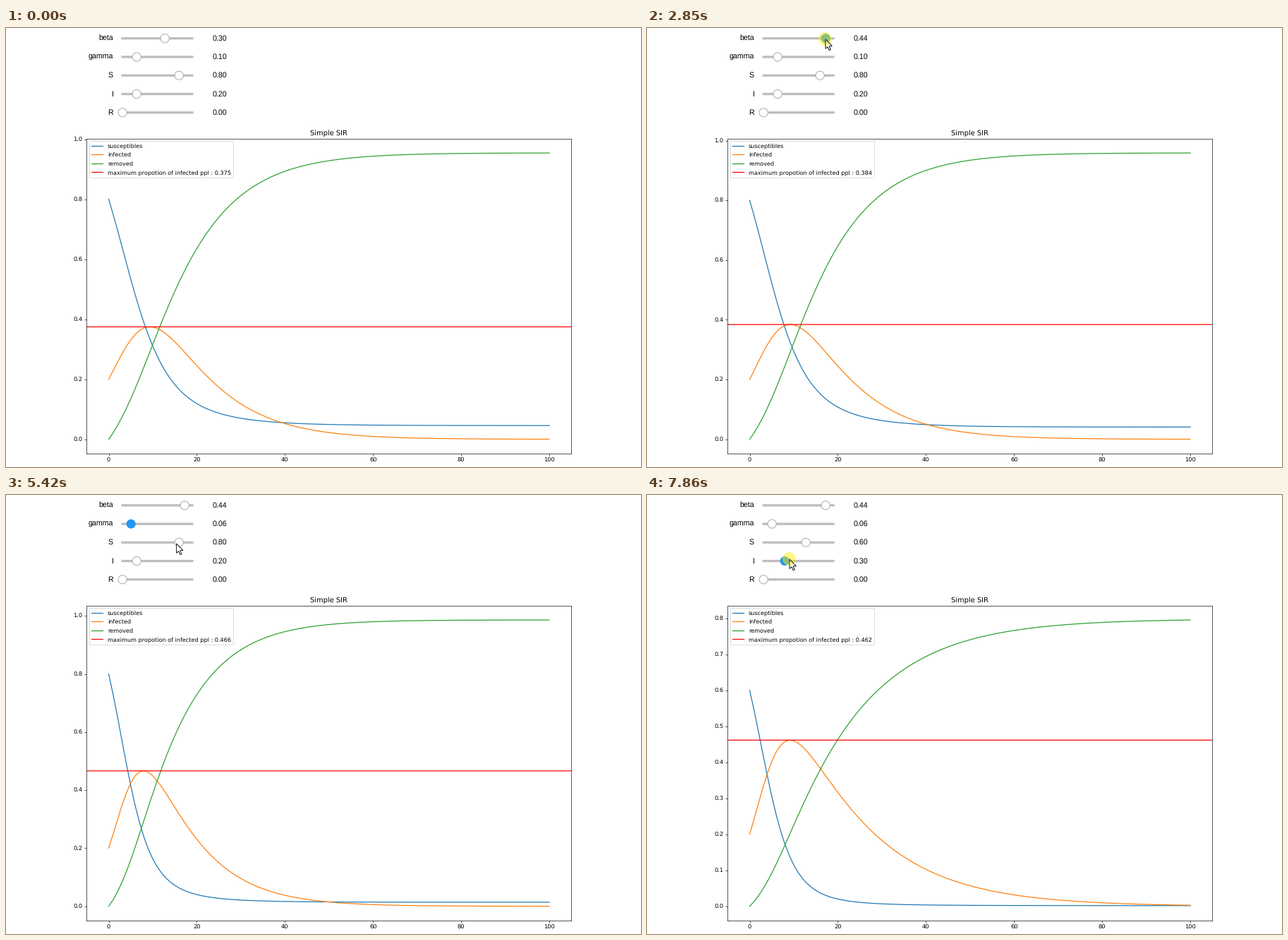
Recreate the animation shown at these times as a matplotlib script. Size 900 px wide and 622 px high, loop 8 s.

```python
import numpy as np
import matplotlib.pyplot as plt
from matplotlib.animation import FuncAnimation
from matplotlib.patches import Circle, Polygon, Rectangle

W, H, DPI = 900, 622, 64
LOOP, STEP = 8000, 40
K = 0.9234  # chart scale relative to default point sizes

plt.rcParams.update({
    "font.family": "DejaVu Sans", "font.size": 10 * K, "text.hinting": "none",
    "axes.linewidth": 0.8 * K, "axes.titlepad": 6.3 * K,
    "lines.linewidth": 1.5 * K, "patch.linewidth": K,
    "legend.fontsize": 9.86 * K, "legend.labelspacing": 0.59,
    "legend.borderaxespad": 0.45,
})
for axis in ("xtick", "ytick"):
    plt.rcParams.update({f"{axis}.major.width": 0.8 * K,
                         f"{axis}.major.size": 3.5 * K,
                         f"{axis}.major.pad": 3.5 * K})

BLUE, GREY, YELLOW = "#2196f3", "#bdbdbd", "#ffee00"


def solve(beta, gamma, s, i, days=100, sub=10):
    """Integrate the SIR equations with RK4, sampled once per day."""
    def rate(y):
        new, out = beta * y[0] * y[1], gamma * y[1]
        return np.array([-new, new - out, out])

    h, y = 1 / sub, np.array([s, i, 0.0])
    rows = [y]
    for _ in range(days):
        for _ in range(sub):
            a = rate(y)
            b = rate(y + h / 2 * a)
            c = rate(y + h / 2 * b)
            d = rate(y + h * c)
            y = y + h / 6 * (a + 2 * b + 2 * c + d)
        rows.append(y)
    return np.array(rows).T


# Every slider tick queues one redraw; the chart works through them with a lag.
queue = [(0.30, 0.10, 0.8, 0.2)]
queue += [(0.29 + 0.01 * n, 0.10, 0.8, 0.2) for n in range(16)]
queue += [(0.44, 0.09 - 0.01 * n, 0.8, 0.2) for n in range(4)]
queue += [(0.44, 0.06, s, 0.2) for s in (0.7, 0.6)]
runs = [solve(*p) for p in queue]


def run_at(t):
    done = np.interp(t, [1500, 1850, 3600, 4700, 6080, 6900, 7700],
                     [0, 1, 6, 11, 15, 19, 22])
    return runs[int(done)]


# Mouse moves: start, end, target x, target y
ENTER = 300
moves = [
    (300, 450, 357, 150), (620, 990, 216, 23), (1140, 1530, 223, 16),
    (1820, 2850, 253, 16), (3100, 3600, 186, 36), (4020, 4420, 180, 40),
    (4810, 5500, 244, 70), (5870, 6340, 226, 70), (6450, 6930, 206, 86),
    (7030, 7250, 188, 91), (7480, 7860, 202, 91),
]


def mouse(t):
    pos = np.array([590.0, 374.0])
    for start, end, x, y in moves:
        u = np.clip((t - start) / (end - start), 0, 1)
        pos += (np.array([x, y]) - pos) * u * u * (3 - 2 * u)
    return pos


fig = plt.figure(figsize=(W / DPI, H / DPI), dpi=DPI, facecolor="white")

# Chart
LEFT, RIGHT, TOP, BOTTOM = 114.3, 801.2, 156.8, 603
ax = fig.add_axes([LEFT / W, 1 - BOTTOM / H,
                   (RIGHT - LEFT) / W, (BOTTOM - TOP) / H])
ax.set_title("Simple SIR")
ax.set_xlim(-5, 105)
days = np.arange(101)
curves = [ax.plot(days, days * 0, label=name)[0]
          for name in ("susceptibles", "infected", "removed")]
PEAK_LABEL = "maximum propotion of infected ppl : {:.3f}"
peak = ax.axhline(0, color="red", snap=False, label=PEAK_LABEL.format(0))
peak_text = ax.legend(loc="upper left").get_texts()[-1]

# Controls, in pixel coordinates
ui = fig.add_axes([0, 0, 1, 1])
ui.set(xlim=(0, W), ylim=(H, 0))
ui.axis("off")


class Slider:
    """A slider that follows the mouse while pressed and is blue from hover to blur."""
    X0, SPAN = 165.2, 100

    def __init__(self, row, name, start, top=1, step=0.1, grip=3,
                 hover=LOOP, press=LOOP, release=LOOP, blur=LOOP):
        self.start, self.top, self.step, self.grip = start, top, step, grip
        self.hover, self.press, self.release, self.blur = hover, press, release, blur
        self.y = y = 14.7 + 26.27 * row
        font = dict(family="Liberation Sans", size=12, va="baseline")
        ui.text(151.9, y + 3, name, ha="right", **font)
        self.text = ui.text(292.4, y + 3, "", ha="left", **font)
        ui.add_patch(Rectangle((163.6, y - 1.65), 102, 3.3, fc=GREY, lw=0, snap=False))
        self.knob = ui.add_patch(Circle((0, y), 6.1, lw=0.95, zorder=3))

    def value(self, t):
        if t < self.press:
            return self.start
        x = mouse(min(t, self.release))[0] - self.grip
        return round((x - self.X0) / self.SPAN * self.top / self.step) * self.step

    def update(self, t):
        v = self.value(t)
        self.text.set_text(f"{v:.2f}")
        self.knob.center = (self.X0 + self.SPAN * v / self.top, self.y)
        on = self.hover <= t < self.blur
        self.knob.set_facecolor(BLUE if on else "white")
        self.knob.set_edgecolor(BLUE if on else "#9e9e9e")


sliders = [
    Slider(0, "beta", 0.3, top=0.5, step=0.01, grip=0,
           hover=1220, press=1680, release=3000, blur=4020),
    Slider(1, "gamma", 0.1, top=0.5, step=0.01,
           hover=3530, press=4020, release=4720, blur=5810),
    Slider(2, "S", 0.8, hover=5500, press=5810, release=6360, blur=7480),
    Slider(3, "I", 0.2, hover=7180, press=7480),
    Slider(4, "R", 0.0),
]

arrow = np.array([(0, 0), (0, 13.4), (3, 10.7), (5.2, 15.6),
                  (7.3, 14.7), (5.1, 9.9), (9.3, 9.6)])
body = ui.add_patch(Polygon(arrow, fc="white", lw=0, zorder=5))
halo = ui.add_patch(Circle((0, 0), 9.4, fc=YELLOW, alpha=0.48, lw=0, zorder=6))
edge = ui.add_patch(Polygon(arrow, fill=False, ec="black", lw=1.0, zorder=7))


def draw(frame):
    t = (frame + 0.5) * STEP
    for s in sliders:
        s.update(t)

    run = run_at(t)
    for line, ys in zip(curves, run):
        line.set_ydata(ys)
    top = run[1].max()
    peak.set_ydata([top, top])
    peak_text.set_text(PEAK_LABEL.format(top))
    ax.set_ylim(-0.05 * run.max(), 1.05 * run.max())

    tip = mouse(t)
    for part in (body, edge):
        part.set_xy(arrow + tip)
        part.set_visible(t >= ENTER)
    halo.center = tip - (0.7, 0.5)
    halo.set_visible(any(s.press <= t < s.release for s in sliders))
    return []


def reset():
    return draw(0)


anim = FuncAnimation(fig, draw, frames=LOOP // STEP, init_func=reset,
                     interval=STEP, repeat=True, repeat_delay=0,
                     cache_frame_data=False)
plt.show()
```
